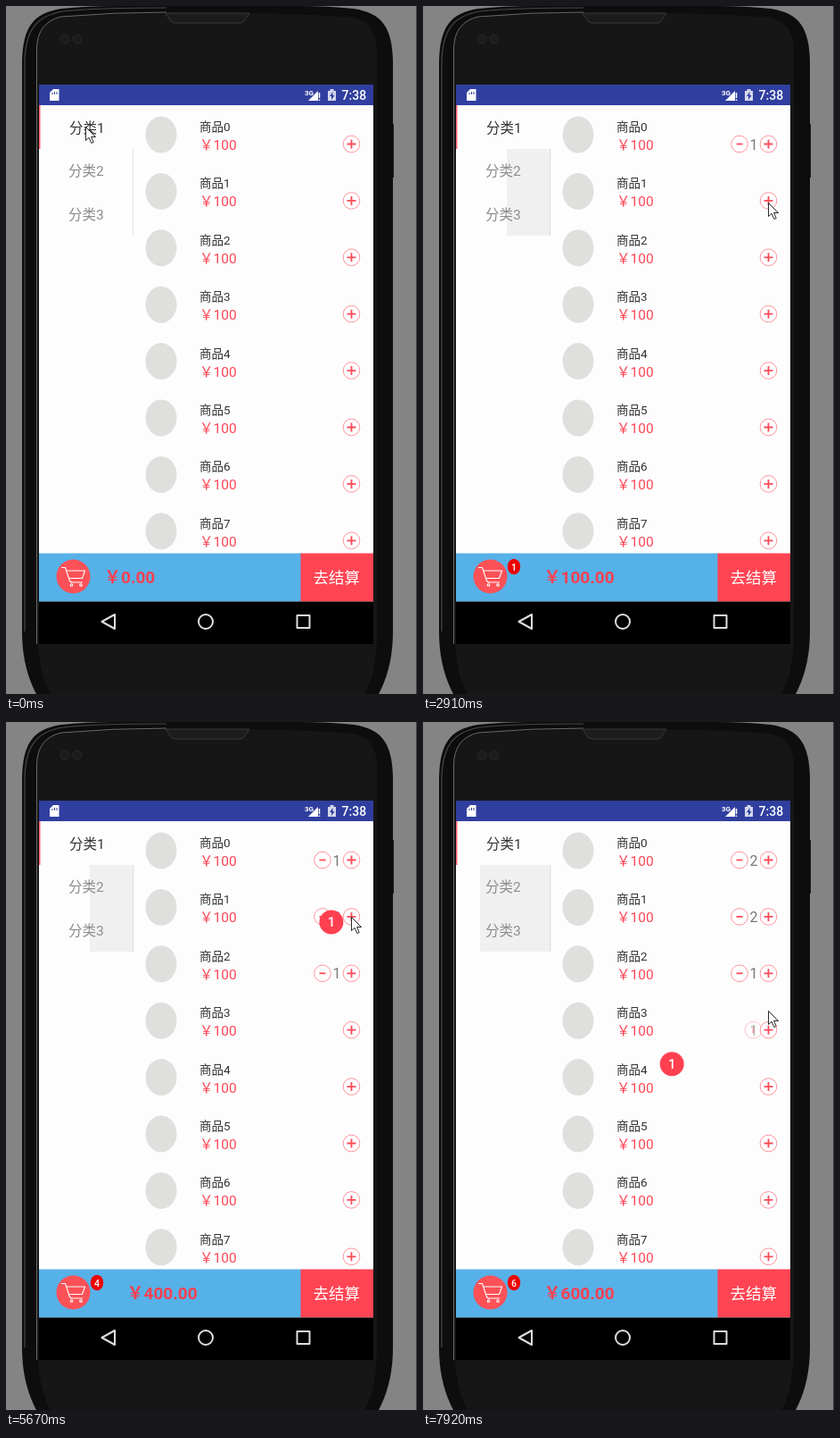
Animation, 461 px wide and 770 px high, one loop 8000 ms. Source, as an HTML page:

```html
<!DOCTYPE html>
<html lang="zh-CN">
<head>
<meta charset="utf-8">
<title>购物车</title>
<style>
  html, body { margin: 0; width: 100%; height: 100%; overflow: hidden; background: #848484; }
  svg { display: block; width: 461px; height: 770px; font-family: Roboto, "Noto Sans CJK SC", "Noto Sans CJK", sans-serif; }
  .name { font-size: 13.5px; fill: #333; }
  .price { font-size: 15.5px; fill: #ff4657; }
  .category { font-size: 15.5px; fill: #8c8c8c; }
  .count { font-size: 16px; fill: #777; text-anchor: middle; }
  .ring { fill: #fff; stroke: #ff8791; stroke-width: .9; }
  .sign { fill: none; stroke: #fa4a59; stroke-width: 1.8; }
  .line { fill: none; stroke: #fff; stroke-width: 1.1; stroke-linejoin: round; }
  .nav { fill: none; stroke: #dedede; stroke-width: 2; stroke-linejoin: round; }
</style>
</head>
<body>
<svg viewBox="0 0 461 770">
  <!-- phone body -->
  <rect width="461" height="770" fill="#848484"/>
  <path d="M460.5 0V770" stroke="#3a4046"/>
  <path d="M432 132h3v60h-3z" fill="#1a1a1a"/>
  <path d="M18 62C19 24 30 8 62 3Q90 0 120 0H332Q362 0 390 3C422 8 433 24 434 62V700Q434 740 418 770H34Q18 740 18 700Z" fill="#0d0d0d"/>
  <path d="M21 700V62C22 28 33 11 64 6Q100 2 180 2" fill="none" stroke="#484848" stroke-width="1.2"/>
  <path d="M35 100V48Q36 18 62 13Q120 8 226 8T390 13Q415 18 416 48V690Q417 745 402 770H50Q35 745 35 690Z" fill="#161616"/>
  <path d="M34.500 714V48Q35 18 62 12Q120 7 180 7" fill="none" stroke="#777" stroke-width=".9"/>
  <path d="M179 8H273L267 17Q266 19 262 19H191Q187 19 185 17Z" fill="#1c1c1c" stroke="#383838"/>
  <g fill="#1c1c1c" stroke="#282828"><circle cx="66" cy="37" r="5"/><circle cx="80" cy="37" r="5"/></g>

  <!-- screen and status bar -->
  <rect x="37" y="88" width="375" height="626" fill="#fdfdfd"/>
  <rect x="37" y="88" width="375" height="23" fill="#303f9f"/>
  <g fill="#fff">
    <path d="M53 93H59.500V106H49V97Z"/>
    <path d="M52 97v2M54.500 96v3M57 96v3" stroke="#303f9f"/>
    <text x="335" y="100" font-size="8" font-weight="700">3G</text>
    <path d="M339 106L350 95V106Z"/>
    <path d="M351.500 97v6M351.500 104.500v1.500" stroke="#fff" stroke-width="1.500"/>
    <path d="M361 95h2.500v-2h4v2H370v11h-9z" opacity=".8"/>
    <path d="M366.500 96l-3.500 5h2v4l3.500-5h-2z" fill="#303f9f"/>
    <text x="376.500" y="105" font-size="14" font-weight="500">7:38</text>
  </g>

  <!-- categories; the sidebar shading is repainted piece by piece -->
  <g fill="#f0f0f0">
    <rect class="shade" data-from="550" x="116" y="160" width="27.500" height="8"/>
    <rect class="shade" data-from="1950" x="94" y="160" width="49.500" height="97"/>
    <rect class="shade" data-from="6450" x="64" y="160" width="79.500" height="97"/>
  </g>
  <rect x="37" y="111" width="1.500" height="49" fill="#ff6274"/>
  <path d="M142.500 160V257" stroke="#e2e2e2"/>
  <text class="category" x="71" y="141.500" style="fill:#333">分类1</text>
  <text class="category" x="70" y="190">分类2</text>
  <text class="category" x="70" y="239">分类3</text>

  <g id="rows"></g>

  <!-- cart bar -->
  <rect x="37" y="612.500" width="294" height="54" fill="#56b1e8"/>
  <rect x="330.500" y="612.500" width="81.500" height="54" fill="#ff4453"/>
  <text x="344.500" y="645.500" font-size="17.500" font-weight="500" fill="#fff">去结算</text>
  <circle cx="75.500" cy="638.500" r="19" fill="#fc5157"/>
  <path class="line" d="M62 628.500H66.500L71 642Q72 645 74 645H86M68 632H88.500L85.500 640.500H70.500"/>
  <circle class="line" cx="73.500" cy="648" r="1.300"/><circle class="line" cx="84" cy="648" r="1.300"/>
  <g id="badge">
    <ellipse cx="102" cy="627.500" rx="7.200" ry="8.700" fill="#ee0000"/>
    <text id="badgeText" x="102" y="631.500" font-size="10.500" font-weight="500" fill="#fff" text-anchor="middle"></text>
  </g>
  <text id="total" y="646" font-size="19" font-weight="700" fill="#fb4050"></text>

  <!-- navigation bar -->
  <rect x="37" y="666.500" width="375" height="47.500" fill="#000"/>
  <path class="nav" d="M107.500 689L122 681V697Z"/>
  <circle class="nav" cx="224" cy="689" r="8"/>
  <rect class="nav" x="326.500" y="682" width="14" height="14"/>

  <g id="balls"></g>
  <path id="cursor" d="M.5 .5V15.500L4 12.300L6.800 18.500L9.200 17.500L6.600 11.500H11.500Z" fill="#fff" stroke="#111" stroke-width=".9"/>
</svg>
<script>
const LOOP = 8000, REFRESH = 140, PHASE = 60;
const FLIGHT = 900, SLIDE = 600, TRAVEL = 600, LINGER = 100;
const ROW = 63.4;
const $ = id => document.getElementById(id);

const taps = [
  { at: 1950, product: 0, y: 154 },
  { at: 3570, product: 1, y: 220 },
  { at: 4484, product: 2, y: 280 },
  { at: 5588, product: 1, y: 218 },
  { at: 6559, product: 0, y: 154 },
  { at: 7587, product: 3, y: 323 }
];

$('rows').innerHTML = Array.from({ length: 8 }, (_, i) => `
  <g transform="translate(0 ${i * ROW})">
    <ellipse cx="174" cy="144" rx="17.500" ry="20.500" fill="#dfe0dd"/>
    <text class="name" x="217" y="140">商品${i}</text>
    <text class="price" x="217" y="161">￥100</text>
    <g class="minus"><circle class="ring" r="9.300"/><path class="sign" d="M-3.500 0H3.500"/></g>
    <text class="count" x="371" y="160.500"></text>
    <g transform="translate(387.500 154.500)"><circle class="ring" r="9.300"/><path class="sign" d="M-5 0H5M0 -5V5"/></g>
  </g>`).join('');

$('balls').innerHTML = taps.map(() => `
  <g><circle r="13.500" fill="#ff4050"/>
  <text y="5.300" font-size="15" font-weight="500" fill="#fff" text-anchor="middle">1</text></g>`).join('');

const rows = [...$('rows').children].map(row => ({
  minus: row.querySelector('.minus'), count: row.querySelector('.count')
}));
const balls = [...$('balls').children];
const shades = document.querySelectorAll('.shade');

const show = (node, on) => node.setAttribute('visibility', on ? 'visible' : 'hidden');
const move = (node, x, y, turn = 0) =>
  node.setAttribute('transform', `translate(${x} ${y}) rotate(${turn})`);
const clamp = p => Math.min(1, Math.max(0, p));
const easeOut = p => 1 - (1 - clamp(p)) ** 3;
const mix = (a, b, p) => a + (b - a) * p;

// The pointer lingers after each tap, then glides to the next product.
function pointerAt(t, count) {
  const from = count ? { ...taps[count - 1], x: 387 } : { at: 230, x: 89, y: 135 };
  const to = taps[count] ?? from;
  const p = easeOut((t - from.at - LINGER) / TRAVEL);
  return [mix(from.x, 387, p), mix(from.y, to.y, p)];
}

function draw(t) {
  const done = taps.filter(tap => tap.at <= t);

  rows.forEach(({ minus, count }, i) => {
    const mine = done.filter(tap => tap.product === i);
    show(minus, mine.length);
    count.textContent = mine.length || '';
    if (!mine.length) return;
    const p = clamp((t - mine[0].at) / SLIDE);
    move(minus, 387.5 - 32.5 * p, 154.5, 180 * p);
    minus.setAttribute('opacity', p);
    count.setAttribute('opacity', p);
  });

  // Each ball falls along a parabola into the cart.
  taps.forEach(({ at, product }, i) => {
    const p = (t - at) / FLIGHT;
    show(balls[i], p >= 0 && p < 1);
    move(balls[i], mix(390.5, 70.5, p), mix(158 + product * ROW, 633.5, p * p));
  });

  shades.forEach(shade => show(shade, t >= shade.dataset.from));
  show($('badge'), done.length);
  $('badgeText').textContent = done.length || '';
  $('total').textContent = `￥${done.length * 100}.00`;
  $('total').setAttribute('x', done.length ? 135.5 : 110);
  move($('cursor'), ...pointerAt(t, done.length));
}

// The screen is repainted at a coarse, steady rate.
const repaintTime = t => Math.max(0, Math.floor((t - PHASE) / REFRESH) * REFRESH + PHASE);

const begin = performance.now();
function tick() {
  draw(repaintTime((performance.now() - begin) % LOOP));
  requestAnimationFrame(tick);
}
tick();
</script>
</body>
</html>
```
